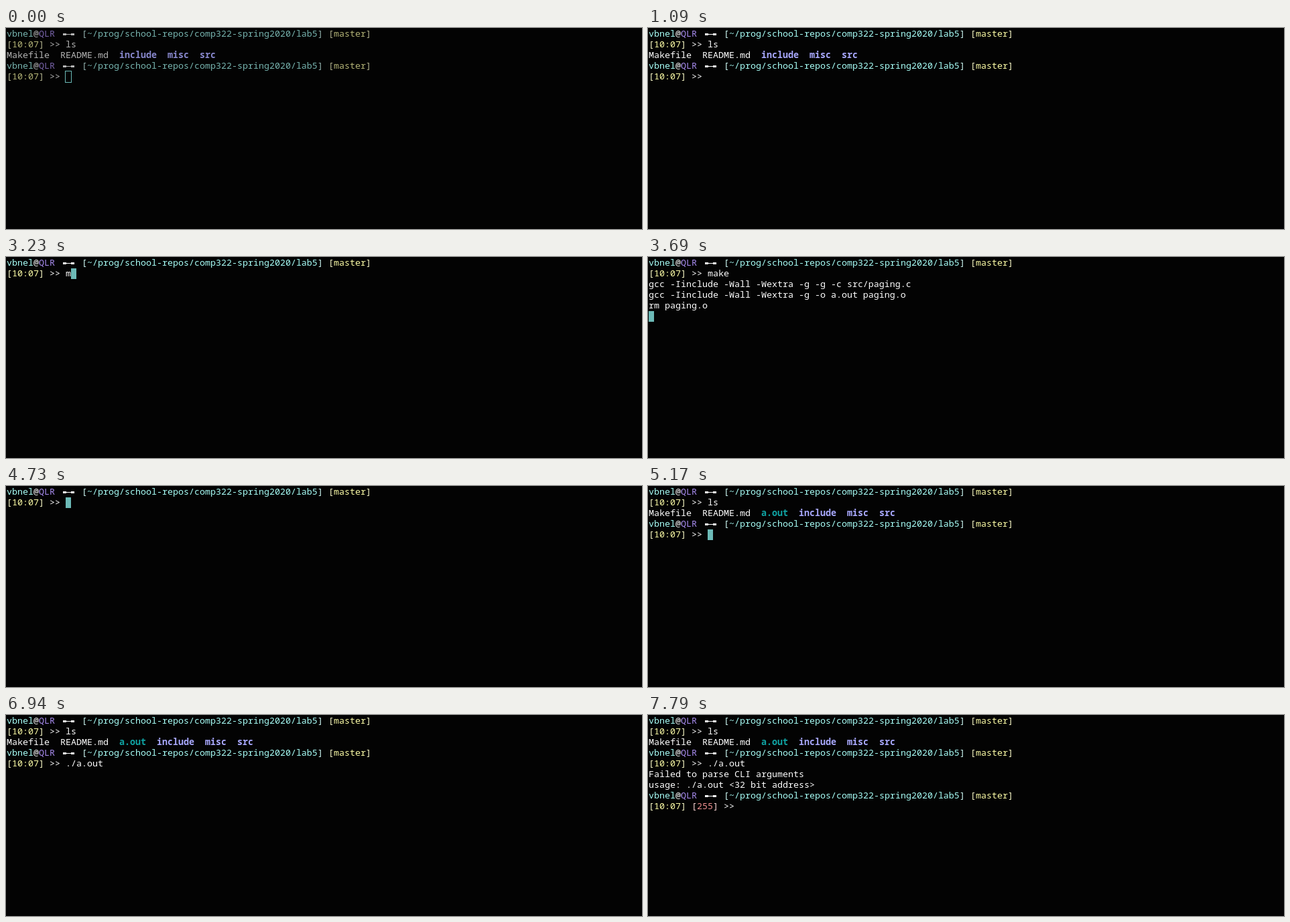
These frames come from a looping animation (949x301 px, 8 s). An HTML page with a canvas:

```html
<!DOCTYPE html>
<html lang="en">
<head>
<meta charset="utf-8">
<style>
  html, body { margin: 0; width: 100%; height: 100%; overflow: hidden; background: #030303; }
  canvas { display: block; }
</style>
</head>
<body>
<canvas id="stage" width="949" height="301"></canvas>
<script>
const ctx = document.getElementById('stage').getContext('2d');
const LOOP = 8000, CELL_W = 8, CELL_H = 16;
const WHITE = '#ffffff', CYAN = '#a8fff8', PURPLE = '#a98cf0', YELLOW = '#ffffa8',
      BLUE = '#a9a9ff', TEAL = '#10a5a5', RED = '#f09090', CURSOR = '#6cbab7';
const ARROW = '╺─╸';

// A line is a list of [text, colour, bold] runs.
const plain = text => [[text, WHITE]];
const head = [
  ['vbnel', CYAN], ['@', WHITE], ['QLR', PURPLE], [' ', WHITE], [ARROW, WHITE],
  [' [', '#d2fffb'], ['~/prog/school-repos/comp322-spring2020/lab5', CYAN], [']', '#d2fffb'],
  [' [', '#ffffcc'], ['master', YELLOW], [']', '#ffffcc']
];
const prompt = (typed = '', status = '') => [
  ['[', '#ffffcc'], ['10:07', YELLOW], [']', '#ffffcc'],
  ...(status ? [[' [', '#ffd8d8'], [status, RED], [']', '#ffd8d8']] : []),
  [' >> ' + typed, WHITE]
];
const listing = built => [
  ['Makefile  README.md  ', WHITE],
  ...(built ? [['a.out', TEAL, true], ['  ', WHITE]] : []),
  ['include', BLUE, true], ['  ', WHITE], ['misc', BLUE, true], ['  ', WHITE], ['src', BLUE, true]
];

const empty = [head, prompt()];
const listed = [head, prompt('ls'), listing(false), head, prompt()];
const typing = text => [head, prompt(text)];
const gcc = 'gcc -Iinclude -Wall -Wextra -g ';
const make = [
  ...typing('make'), plain(gcc + '-g -c src/paging.c'),
  plain(gcc + '-o a.out paging.o'), plain('rm paging.o')
];
const made = [...make, head, prompt()];
const built = [head, prompt('ls'), listing(true)];
const running = text => [...built, head, prompt(text)];
const ran = [
  ...running('./a.out '), plain('Failed to parse CLI arguments'),
  plain('usage: ./a.out <32 bit address>')
];
const failed = [...ran, head, prompt('', '255')];
const newline = plain('');

// [start, lines, cursor]; the cursor sits after the last line.
const steps = [
  [0, listed, 'hollow'], [520, listed, 'solid'], [1090, listed], [1550, listed, 'solid'],
  [1790, empty], [1830, empty, 'solid'], [2390, empty], [2990, empty, 'solid'],
  [3230, typing('m'), 'solid'], [3290, typing('ma'), 'solid'],
  [3360, typing('mak'), 'solid'], [3430, typing('make'), 'solid'],
  [3530, [...make.slice(0, 3), newline], 'solid'],
  [3610, [...make.slice(0, 4), newline], 'solid'],
  [3690, [...make, newline], 'solid'],
  [3730, made, 'solid'], [4170, made], [4590, made, 'solid'],
  [4730, empty, 'solid'], [4960, typing('l'), 'solid'], [5030, typing('ls'), 'solid'],
  [5130, [...built, newline], 'solid'],
  [5170, running(''), 'solid'], [5720, running('')], [5910, running(''), 'solid'],
  [5950, running('.'), 'solid'], [6140, running('./'), 'solid'],
  [6250, running('./a'), 'solid'], [6370, running('./a.out '), 'solid'],
  [6940, running('./a.out ')],
  [7200, [...running('./a.out '), newline], 'solid'],
  [7250, [...ran, newline], 'solid'],
  [7290, failed, 'solid'], [7790, failed]
];

function drawArrow(x, y) {
  ctx.fillRect(x + 4, y + 7, 5, 3);
  ctx.fillRect(x + 9, y + 8, 7, 1);
  ctx.fillRect(x + 16, y + 7, 5, 3);
}

// Draws one line and returns the x just after it.
function drawLine(runs, y, dimmed) {
  let x = 1;
  for (const [text, colour, bold] of runs) {
    ctx.globalAlpha = !dimmed ? 1 : bold ? 0.8 : 0.7;
    ctx.fillStyle = colour;
    ctx.font = (bold ? 'bold ' : '') + '13.3333px "Noto Sans Mono", "DejaVu Sans Mono", monospace';
    if (text === ARROW) drawArrow(x, y);
    else ctx.fillText(text, x, y + 12);
    x += text.length * CELL_W;
  }
  ctx.globalAlpha = 1;
  return x;
}

function draw(now) {
  const t = now % LOOP;
  const [, lines, cursor] = steps.findLast(step => step[0] <= t);
  const dimmed = cursor === 'hollow'; // the window has no focus yet
  ctx.fillStyle = '#030303';
  ctx.fillRect(0, 0, 949, 301);

  let x = 1;
  lines.forEach((line, row) => { x = drawLine(line, 1 + row * CELL_H, dimmed); });
  const y = 1 + (lines.length - 1) * CELL_H;
  if (cursor === 'solid') {
    ctx.fillStyle = CURSOR;
    ctx.fillRect(x, y, CELL_W, CELL_H);
  } else if (cursor === 'hollow') {
    ctx.strokeStyle = CURSOR;
    ctx.strokeRect(x - 0.5, y - 0.5, CELL_W + 1, CELL_H + 1);
  }
}

function tick() {
  draw(performance.now());
  requestAnimationFrame(tick);
}
tick();
</script>
</body>
</html>
```
